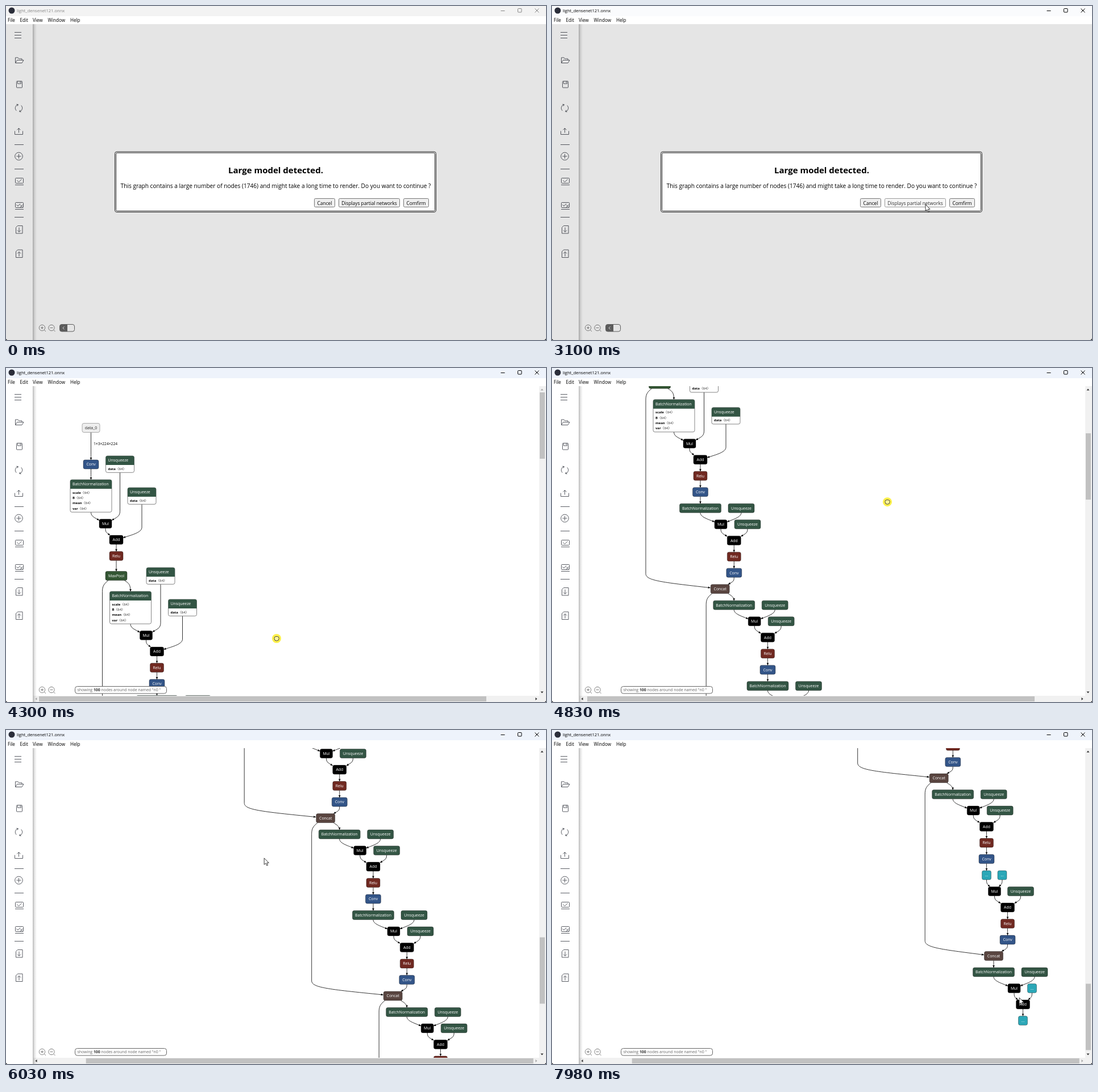
These frames come from a looping animation (950x589 px, 8 s). An HTML page with a canvas:

```html
<!DOCTYPE html>
<html lang="en">
<head>
<meta charset="utf-8">
<title>Model viewer</title>
<style>
html, body { margin: 0; width: 950px; height: 589px; overflow: hidden; background: #000; }
canvas { display: block; }
</style>
</head>
<body>
<canvas id="stage" width="950" height="589"></canvas>
<script>
const ctx = document.getElementById('stage').getContext('2d');
const LOOP = 8000, ROW = 28.5;
const FAMILY = '"Open Sans", "Noto Sans", "Noto Sans CJK SC", "Noto Sans CJK JP", sans-serif';

// ---------- drawing helpers ----------
function text(str, x, y, size, color = '#000', align = 'left', weight = 400) {
  ctx.font = `${weight} ${size}px ${FAMILY}`;
  ctx.fillStyle = color;
  ctx.textAlign = align;
  ctx.textBaseline = 'alphabetic';
  ctx.fillText(str, x, y + size * 0.36);
  return ctx.measureText(str).width;
}
function rect(x, y, w, h, fill) {
  ctx.fillStyle = fill;
  ctx.fillRect(x, y, w, h);
}
function box(x, y, w, h, r, fill, stroke, width = 1) {
  ctx.beginPath();
  ctx.roundRect(x, y, w, h, r);
  paint(fill, stroke, width);
}
function disc(x, y, r, fill, stroke, width = 1) {
  ctx.beginPath();
  ctx.arc(x, y, r, 0, 2 * Math.PI);
  paint(fill, stroke, width);
}
function paint(fill, stroke, width) {
  if (fill) { ctx.fillStyle = fill; ctx.fill(); }
  if (stroke) { ctx.strokeStyle = stroke; ctx.lineWidth = width; ctx.stroke(); }
}
function path(d, stroke, width = 1, fill) {
  const p = new Path2D(d);
  if (fill) { ctx.fillStyle = fill; ctx.fill(p); }
  if (stroke) { ctx.strokeStyle = stroke; ctx.lineWidth = width; ctx.stroke(p); }
}
function at(x, y, draw, angle = 0) {
  ctx.save();
  ctx.translate(x, y);
  ctx.rotate(angle);
  draw();
  ctx.restore();
}

// ---------- graph model ----------
const STYLE = {
  data_0: ['#eeeeee', 31], Conv: ['#335588', 27], BatchNormalization: ['#335544', 73],
  Unsqueeze: ['#335544', 46], Mul: ['#000', 22], Add: ['#000', 24], Relu: ['#702921', 24],
  MaxPool: ['#335533', 38], Concat: ['#594540', 33], '...': ['#2ba7b7', 16]
};
const nodes = [], edges = [];

function add(type, x, y, inputs = [], rows = []) {
  const [fill, width] = STYLE[type];
  const n = { type, x, y, fill, rows, w: width, h: 16 };
  if (rows.length) {
    n.h = 20 + rows.length * 9.3;
    if (type === 'Unsqueeze') n.w = 50;
  }
  nodes.push(n);
  inputs.forEach(a => edges.push({ a, b: n }));
  return n;
}
const below = (n, type, dx = 0, dy = ROW) => add(type, n.x + dx, n.y + dy, [n]);
const skip = (a, b) => edges.push({ a, b, skip: true });

// Normalise, scale, shift and activate; tall nodes list their weights.
function block(src, x, y, tall = false, s = 0) {
  const o = tall ? [51 + s, -42, 89.5 + s, 14, 25.5 + s, 69.5, 44.5 + s, 98]
                 : [72, 0, 83, ROW, 36, ROW, 59.3, 2 * ROW];
  const data = tall ? ['data'] : [];
  const norm = add('BatchNormalization', x, y, [src], tall ? ['scale', 'B', 'mean', 'var'] : []);
  const scale = add('Unsqueeze', x + o[0], y + o[1], [], data);
  const shift = add('Unsqueeze', x + o[2], y + o[3], [], data);
  const mul = add('Mul', x + o[4], y + o[5], [norm, scale]);
  return below(add('Add', x + o[6], y + o[7], [mul, shift]), 'Relu');
}
function buildGraph() {
  const input = add('data_0', 149.5, 105.5);
  const first = below(input, 'Conv', 0, 64.5);
  const pool = below(block(first, 149.5, 205, true), 'MaxPool', 0, 35);
  let conv = below(block(pool, 219, 402, true, 2), 'Conv');
  let from = pool, concat;
  for (let i = 0; i < 5; i++) {
    if (i) conv = below(block(concat, concat.x + 24.5, concat.y + ROW), 'Conv');
    conv = below(block(conv, conv.x, conv.y + ROW), 'Conv');
    concat = below(conv, 'Concat', -24.6);
    skip(from, concat);
    from = concat;
  }
  conv = below(block(concat, concat.x + 24.5, concat.y + ROW), 'Conv');
  const { x, y } = conv;
  const dots = below(conv, '...');
  const mul = add('Mul', x + 14, y + 2 * ROW, [dots, add('...', x + 27.5, y + ROW)]);
  const sum = add('Add', x + 37, y + 3 * ROW, [mul, add('Unsqueeze', x + 60, y + 2 * ROW)]);
  const last = below(below(below(sum, 'Relu'), 'Conv'), 'Concat', -24.5);
  skip(concat, last);
  const norm = below(last, 'BatchNormalization');
  const mul2 = add('Mul', norm.x + 36, norm.y + ROW, [norm, add('Unsqueeze', norm.x + 72, norm.y)]);
  below(add('Add', norm.x + 51.5, norm.y + 2 * ROW, [mul2, add('...', norm.x + 67.5, norm.y + ROW)]), '...');
}
buildGraph();

// Point where a ray from the node centre leaves its box.
function exit(n, dx, dy) {
  const k = Math.min(n.w / 2 / Math.abs(dx || 1e-9), 8 / Math.abs(dy));
  return [n.x + dx * k, n.y + dy * k];
}
function drawEdge({ a, b, skip }) {
  let d, ctrl, end;
  const dx = a.x - b.x, bottom = a.y - 8 + a.h;
  if (skip) {
    const x = a.x - 24.5;
    end = [b.x - 17, b.y - 2];
    ctrl = [b.x - 60, b.y - 8];
    d = `M${exit(a, -24.5, 14)} C${x + 3},${a.y + 14} ${x},${a.y + 18} ${x},${a.y + 28}
      V${b.y - 27} C${x},${b.y - 15} ${x + 25},${b.y - 12} ${end}`;
  } else if (/Concat|MaxPool/.test(a.type) && Math.abs(dx) > 3) {
    end = [b.x, b.y - 8];
    ctrl = [b.x, a.y + 15];
    d = `M${exit(a, -dx, 14)} C${b.x - 3},${a.y + 13} ${ctrl} ${end}`;
  } else {
    const side = Math.abs(dx) > 3;
    end = side ? exit(b, dx, -14) : [b.x, b.y - 8];
    ctrl = side ? [end[0] + dx * 0.35, end[1] - 5] : [b.x, end[1] - 5];
    d = `M${a.x},${bottom} V${Math.max(bottom, b.y - 22)} C${a.x},${b.y - 13} ${ctrl} ${end}`;
  }
  path(d, '#000', 0.8);
  at(...end, () => path('M0,0 L-4,-1.8 V1.8 Z', null, 0, '#000'),
    Math.atan2(end[1] - ctrl[1], end[0] - ctrl[0]));
}
function drawNode(n) {
  const left = n.x - n.w / 2, top = n.y - 8;
  if (n.rows.length) {
    box(left, top, n.w, n.h, 3, '#fff', '#666', 0.8);
    box(left, top, n.w, 16, [3, 3, 0, 0], n.fill);
    text(n.type, left + 4, n.y, 6.9, '#fff');
    n.rows.forEach((row, i) => {
      const y = n.y + 14.5 + i * 9.35;
      const w = text(row, left + 4, y, 5.9, '#000', 'left', 700);
      text('\u300864\u3009', left + 4 + w, y, 5.9, '#222');
    });
  } else {
    const isInput = n.type === 'data_0';
    box(left, top, n.w, n.h, 3, n.fill, isInput ? '#888' : 'rgba(0,0,0,.5)', 0.7);
    text(n.type, n.x, n.y, 6.9, isInput ? '#222' : '#fff', 'center');
  }
}

// ---------- pointer: time, x, y, and 1 where a drag begins or goes on ----------
const KEYS = [
  [500, 884, 575], [1300, 321, 324], [1770, 438, 323], [1960, 438, 323], [2030, 430, 323],
  [2310, 430, 323], [2770, 657, 350], [3980, 657, 350],
  [4240, 476, 477, 1], [4330, 476, 477, 1], [4500, 480, 302],
  [4650, 594.5, 399.5, 1], [4830, 590, 237, 1], [4930, 588, 149.5],
  [5060, 680, 470, 1], [5230, 640, 140], [5340, 683, 458, 1], [5510, 636, 144, 1], [5600, 620, 100],
  [5720, 560, 500, 1], [5960, 480, 100], [6180, 400, 490, 1], [6480, 335, 96, 1],
  [6580, 335, 96, 1], [6700, 335, 105.5], [6900, 310, 130],
  [7370, 793, 258], [7430, 787, 252], [7640, 785, 249], [7980, 822, 472]
];
const clamp = (v, lo, hi) => Math.min(Math.max(v, lo), hi);

// Dragging moves the view against the pointer, held inside the scroll range.
function poseAt(t) {
  const pose = { x: 0, y: 0, sx: 0, sy: 0, visible: t >= KEYS[0][0], dragging: false };
  KEYS.forEach(([start, x, y, drag], i) => {
    if (start > t) return;
    const [end, nx, ny] = KEYS[i + 1] || [LOOP, x, y];
    const u = Math.min((t - start) / (end - start), 1);
    const dx = (nx - x) * u, dy = (ny - y) * u;
    if (drag) {
      pose.sx = clamp(pose.sx - dx, 0, 93.5);
      pose.sy = clamp(pose.sy - dy, 0, 1906.5);
    }
    Object.assign(pose, { x: x + dx, y: y + dy, dragging: drag });
  });
  return pose;
}

// ---------- interface ----------
function drawGraph(sx, sy) {
  ctx.save();
  ctx.beginPath();
  ctx.rect(47, 32, 891, 546);
  ctx.clip();
  ctx.translate(-sx, -sy);
  edges.forEach(drawEdge);
  text('1×3×224×224', 154, 134, 6.7);
  nodes.forEach(drawNode);
  ctx.restore();
}
function drawScrollbars(sx, sy) {
  const arrow = (x, y, turn, on) => at(x, y,
    () => path('M-2.5,1.5 H2.5 L0,-1.5 Z', null, 0, on ? '#333' : '#a8a8a8'), turn * Math.PI / 2);
  rect(938, 32, 12, 557, '#f1f1f1');
  rect(48, 578, 890, 11, '#f1f1f1');
  rect(939, 43 + sy / 4.69, 9, 117, '#c1c1c1');
  rect(58 + sx * 0.885, 579, 787, 9, '#c1c1c1');
  arrow(943, 38, 0, sy > 0);
  arrow(943, 572, 2, sy < 1906);
  arrow(53, 583.5, 3, sx > 0);
  arrow(933, 583.5, 1, sx < 93);
}
function drawIcons() {
  const ink = '#5c5f66';
  const icon = (x, y, d) => at(x, y, () => path(d, ink));
  const arrow = (x, y, turn = 0) => at(x, y, () => path('M0,4 V-4 M-3,-1 L0,-4 L3,-1', ink), turn);
  [46.5, 51.5, 56.5].forEach(y => icon(15, y, 'M0,0 H12'));
  [244.5, 287.5, 372.5].forEach(y => icon(15, y, 'M0,0 H16'));
  icon(16.5, 100.5, 'M0,0 V-9.5 H4.5 L6,-7.5 H11.5 V-5 M0,0 L3,-5 H14.5 L11.5,0 Z');
  box(18.5, 132.5, 10, 11.5, 1, null, ink);
  icon(20.5, 132.5, 'M0,0 V4.5 H6 V0 M4,1 V3');
  for (const turn of [0, Math.PI])
    at(22.5, 180, () => path('M-4.3,4.6 A6.3,6.3 0 0 1 -1.5,-6.1 M-4,-6.8 L-1,-6.2 L-2.5,-3.5', ink), turn);
  icon(15.5, 220.5, 'M0,0 V6 H14 V0');
  arrow(22.5, 219.5);
  disc(22.5, 265, 6.8, null, ink);
  icon(22.5, 265, 'M-4,0 H4 M0,-4 V4');
  for (const y of [303.5, 346.5]) {
    box(16.5, y, 14, 9, 1, null, ink);
    icon(16, y + 12, 'M0,0 H15');
  }
  icon(19.5, 307.5, 'M0,0 L3,3 L8,-2');
  icon(18.5, 350.5, 'M0,0 L2.5,2.5 L6.5,-2 M6.5,0 L11,4.5 M11,0 L6.5,4.5');
  for (const y of [394.5, 437]) icon(23, y, 'M-2.5,-7 H6 V6.5 H-5.5 V-4 Z');
  arrow(23, 394.5, Math.PI);
  arrow(23, 437.5);
  for (const x of [63.5, 80]) {
    disc(x, 567.5, 5.2, null, '#777', 0.9);
    at(x, 567.5, () => path('M3.8,3.8 L6.5,6.5 M-2.5,0 H2.5' + (x < 70 ? 'M0,-2.5 V2.5' : ''), '#777', 0.9));
  }
}
function drawSidebar() {
  rect(0, 32, 47, 557, '#fff');
  const shade = ctx.createLinearGradient(47, 0, 54, 0);
  shade.addColorStop(0, 'rgba(0,0,0,.28)');
  shade.addColorStop(0.45, 'rgba(0,0,0,.1)');
  shade.addColorStop(1, 'rgba(0,0,0,0)');
  rect(47, 32, 7, 557, shade);
  drawIcons();
}
function drawToggle() {
  box(94.5, 561.5, 26, 12.5, 3.5, '#fff', '#666');
  box(94.5, 561.5, 13.5, 12.5, [3.5, 0, 0, 3.5], '#666');
  path('M102.5,565.3 L100,567.8 L102.5,570.3', '#fff');
}
function drawToast() {
  box(121.5, 561.5, 161, 12.5, 4, '#fff', '#666');
  let x = 125.5;
  x += text('showing ', x, 568, 6.9, '#666');
  x += text('100', x, 568, 6.9, '#333', 'left', 700);
  text(' nodes around node named "n0 "', x, 568, 6.9, '#666');
}
function button(label, x, w, hover) {
  box(x + 0.5, 339.5, w - 1, 15, 2, hover ? '#f7f7f7' : '#efefef', hover ? '#9a9a9a' : '#767676');
  text(label, x + w / 2, 347.5, 8.35, hover ? '#333' : '#000', 'center');
}
function drawDialog(hover) {
  box(191.5, 257, 565, 106.5, 3.5, '#fff', '#222');
  box(193.5, 259, 561, 102.5, 2, null, '#222');
  text('Large model detected.', 474.5, 289.5, 15, '#000', 'center', 700);
  text('This graph contains a large number of nodes (1746) and might take a long time to render. Do you want to continue ?',
    474.5, 317, 10.13, '#000', 'center');
  button('Cancel', 542, 37);
  button('Displays partial networks', 585, 108, hover);
  button('Comfirm', 699, 45);
}
function drawTitleBar(t) {
  const ink = t < 3050 ? '#858585' : '#000';
  rect(0, 0, 950, 18, t < 3050 ? '#f3f3f3' : t < 3170 ? '#fafbfd' : '#eef3fb');
  rect(0, 18, 950, 14, '#fff');
  disc(10, 8, 5.5, '#2b2e3a');
  text('light_densenet121.onnx', 19, 8.5, 7.55, ink);
  path('M870.5,8.5 h7 M930.5,4.5 l7,7 m0,-7 l-7,7', ink);
  box(900.5, 4.5, 6.5, 6.5, 1, null, ink);
  const menu = { File: 3, Edit: 24.5, View: 47, Window: 73.5, Help: 113 };
  for (const label in menu) text(label, menu[label], 25.5, 8.1);
}
function drawPointer({ x, y, dragging }) {
  at(x, y, () => {
    if (dragging) {
      disc(0, 0, 8, '#fdf04a');
      box(-4, -3.5, 8.2, 7.6, [3, 3, 4, 4], '#fff59a', '#333', 0.9);
    } else {
      path('M0,0 V11.5 L2.7,9 L4.6,13.2 L6.5,12.4 L4.7,8.4 H8.2 Z', '#222', 0.9, '#fff');
    }
  });
}

function draw(t) {
  const pose = poseAt(t), loaded = t >= 3230;
  rect(0, 0, 950, 589, '#000');
  ctx.save();
  ctx.beginPath();
  ctx.roundRect(0, 0, 950, 589, [0, 0, 4, 4]);
  ctx.clip();
  rect(0, 0, 950, 589, '#fff');
  if (loaded) {
    drawGraph(pose.sx, pose.sy);
    drawScrollbars(pose.sx, pose.sy);
  }
  drawSidebar();
  if (loaded) drawToast();
  else drawToggle();
  if (t < 3170) {
    rect(0, 32, 950, 557, 'rgba(0,0,0,.1)');
    drawDialog(t >= 2700);
  }
  drawTitleBar(t);
  if (pose.visible) drawPointer(pose);
  ctx.restore();
}
function tick() {
  draw(performance.now() % LOOP);
  requestAnimationFrame(tick);
}
tick();
</script>
</body>
</html>
```
